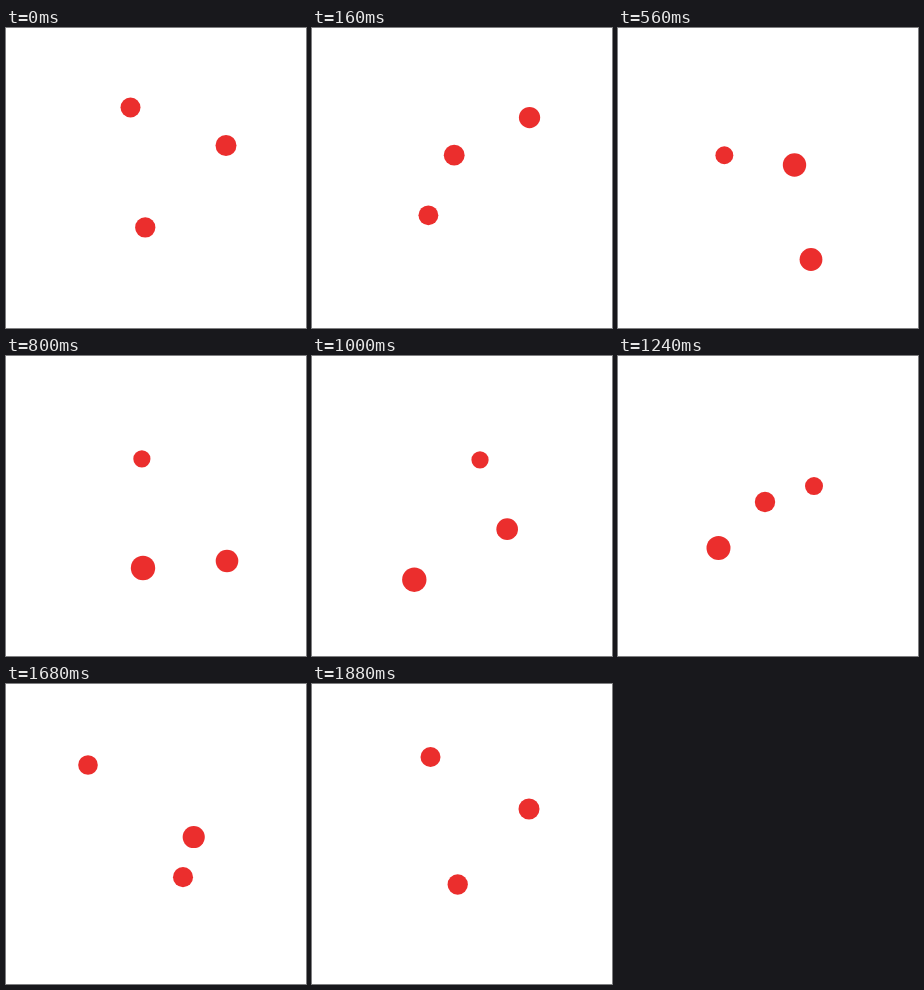
Write an HTML page that moves like this. It is 300 px wide and 300 px high and loops after 1920 ms.

```html
<!DOCTYPE html>
<html lang="en">
<head>
<meta charset="utf-8">
<title>Orbiting dots</title>
<style>
  html, body { margin: 0; width: 100%; height: 100%; overflow: hidden; background: #fff; }
  svg { display: block; width: 100vw; height: 100vh; }
  circle { fill: #eb2e2d; }
</style>
</head>
<body>
<svg viewBox="0 0 300 300">
  <circle id="ring"/>
  <circle id="falling"/>
  <circle id="rising"/>
</svg>
<script>
  const LOOP = 1920, STEP = 40;

  // Closed paths through a few points: [time in ms, x, y, radius]
  const falling = [
    [0, 124.5, 79.5, 10], [320, 158.5, 181, 11], [560, 193, 231.5, 11.4],
    [630, 206, 234.5, 11.4], [740, 223, 218, 11.4], [800, 221, 205, 11.3],
    [1240, 147, 146, 10.2], [1480, 101, 119, 9.8], [1680, 82, 81, 9.8],
    [1790, 98.5, 67, 9.9], [1880, 118.5, 73, 10]
  ];
  const rising = [
    [0, 220, 117.5, 10.5], [80, 222.5, 102.5, 10.5], [200, 213, 85.5, 10.7],
    [320, 193, 86.5, 11], [560, 176.5, 137, 11.7], [800, 137, 212, 12.2],
    [960, 108.5, 225, 12.2], [1120, 90, 211, 12.1], [1240, 100.5, 192, 12],
    [1480, 148, 172.5, 11.8], [1880, 217, 125, 10.5]
  ];

  // Knot by index, wrapping around the loop
  function knot(path, i) {
    const n = path.length, turn = Math.floor(i / n);
    const [t, ...v] = path[i - turn * n];
    return { t: t + turn * LOOP, v };
  }

  // Slope at a knot, weighted for uneven spacing
  function slope(path, i, k) {
    const a = knot(path, i - 1), b = knot(path, i), c = knot(path, i + 1);
    const h1 = b.t - a.t, h2 = c.t - b.t;
    return ((b.v[k] - a.v[k]) / h1 * h2 + (c.v[k] - b.v[k]) / h2 * h1) / (h1 + h2);
  }

  function along(path, t) {
    const i = path.findLastIndex(p => p[0] <= t);
    const a = knot(path, i), b = knot(path, i + 1);
    const h = b.t - a.t, s = (t - a.t) / h, q = 1 - s;
    return a.v.map((v, k) =>
      (1 + 2 * s) * q * q * v + s * q * q * h * slope(path, i, k) +
      s * s * (3 - 2 * s) * b.v[k] - s * s * q * h * slope(path, i + 1, k));
  }

  function circling(t) {
    const a = t / LOOP * 2 * Math.PI + 13 * Math.PI / 180;
    return [150.5 - 50 * Math.sin(a), 150.75 + 50 * Math.cos(a), 9.35 + 0.8 * Math.cos(a)];
  }

  function place(id, [x, y, r]) {
    const dot = document.getElementById(id);
    dot.setAttribute("cx", x);
    dot.setAttribute("cy", y);
    dot.setAttribute("r", r);
  }

  const start = performance.now();
  function draw() {
    const t = Math.floor((performance.now() - start) % LOOP / STEP) * STEP;
    place("ring", circling(t));
    place("falling", along(falling, t));
    place("rising", along(rising, t));
    requestAnimationFrame(draw);
  }
  draw();
</script>
</body>
</html>
```
